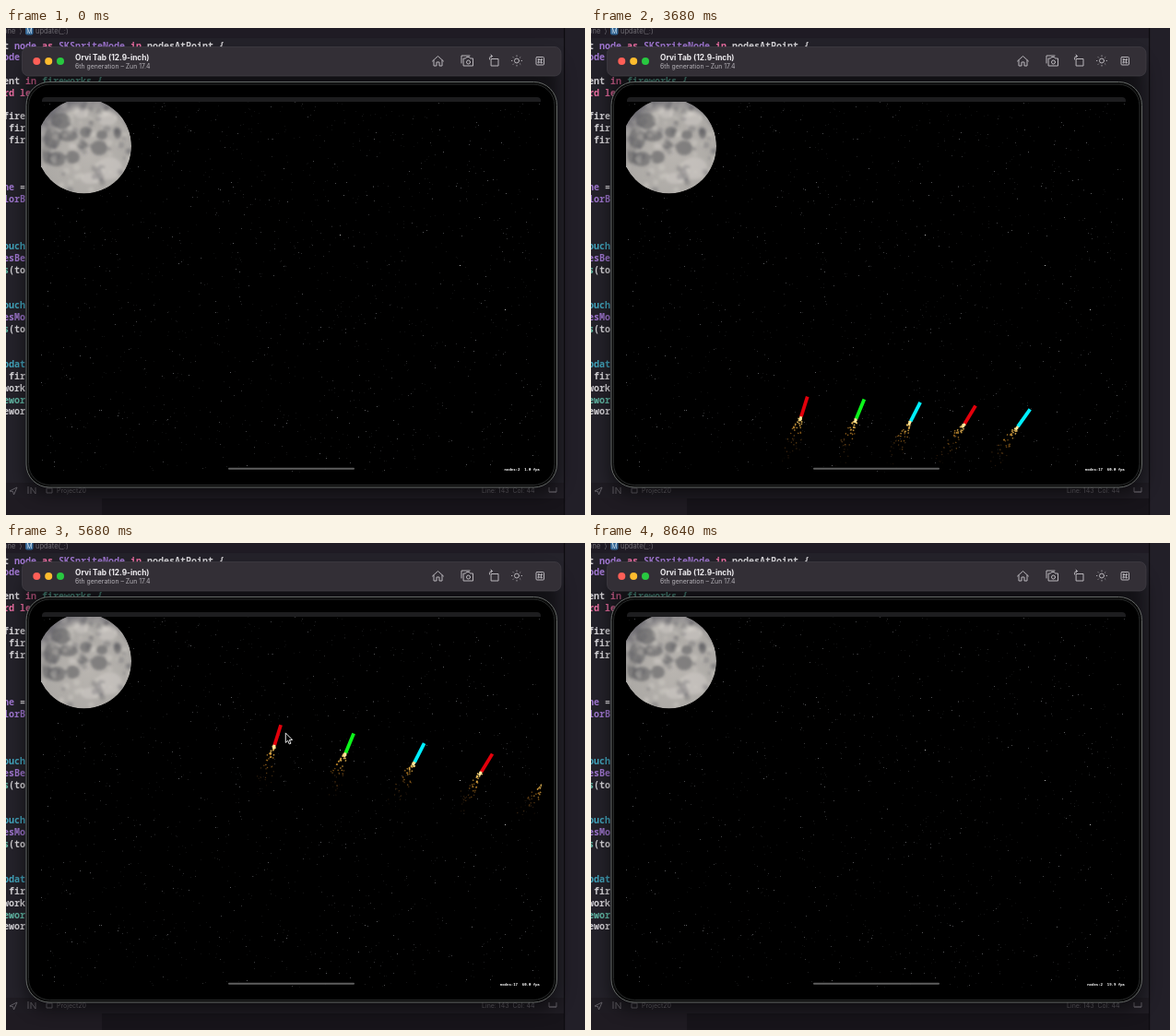
Write an HTML page with a canvas that moves like this. It is 628 by 528 pixels and loops after 8.72 s.

```html
<!DOCTYPE html>
<html lang="en">
<head>
<meta charset="utf-8">
<title>Fireworks in the simulator</title>
<style>
  html, body { margin: 0; width: 628px; height: 528px; overflow: hidden; background: #211f27; }
  svg, canvas { position: absolute; left: 0; top: 0; }
  text { white-space: pre; font-family: Inter, sans-serif; }
  .code text { font: 600 10px "Noto Sans Mono", monospace; }
  .icons { fill: none; stroke: #b9b6bb; stroke-width: 1; stroke-linejoin: round; stroke-linecap: round; }
</style>
</head>
<body>
<svg width="628" height="528" viewBox="0 0 628 528">
  <defs>
    <filter id="shadow" x="-20%" y="-20%" width="140%" height="140%"><feGaussianBlur stdDeviation="9"/></filter>
    <filter id="soft" x="-20%" y="-20%" width="140%" height="140%"><feGaussianBlur stdDeviation="1.5"/></filter>
    <radialGradient id="moonlight" cx=".55" cy=".6" r=".6">
      <stop offset="0" stop-color="#b9b5b0"/><stop offset=".8" stop-color="#aca9a5"/><stop offset="1" stop-color="#77757a"/>
    </radialGradient>
    <clipPath id="sky"><rect x="38" y="80" width="543" height="402"/></clipPath>
    <clipPath id="disc"><circle cx="84.500" cy="128" r="51.500"/></clipPath>
  </defs>

  <!-- Editor behind the simulator -->
  <rect width="628" height="528" fill="#24222a"/>
  <rect width="605" height="11" fill="#1f1b24"/>
  <rect x="605" width="1.500" height="528" fill="#0d0b10"/>
  <rect x="606.500" width="22" height="528" fill="#221f28"/>
  <rect y="493" width="605" height="17" fill="#1f1c23"/>
  <rect y="510" width="104" height="18" fill="#1f1b22"/>
  <rect x="104" y="510" width="501" height="18" fill="#17141a"/>
  <g fill="#6d6a71" font-size="7.500">
    <text x="-3" y="6">one  ⟩</text>
    <rect x="21" y="-1" width="8.500" height="8.500" rx="2" fill="#2f6290"/>
    <text x="22.300" y="5.800" font-size="7" fill="#cfe0ee">M</text>
    <text x="32" y="6">update(_:)</text>
  </g>
  <g class="code" id="code"></g>
  <g fill="none" stroke="#625f66">
    <path d="M4 502l8-4-3.500 8-1-3.500zM24 497v8M27 505v-7l5 7v-7M44 499h6v5h-6z"/>
    <path d="M589 503h8M589 498v5h8v-5"/>
  </g>
  <g fill="#6a676e" font-size="7">
    <text x="55" y="503.500">Project20</text>
    <text x="516" y="503.500">Line: 143  Col: 44</text>
  </g>
  <rect x="20" y="30" width="580" height="476" rx="24" fill="#000" opacity=".5" filter="url(#shadow)"/>

  <!-- Device -->
  <rect x="22" y="58.500" width="575.500" height="439.500" rx="25" fill="#080808" stroke="#656967"/>
  <rect x="24.500" y="61" width="570.500" height="434.500" rx="23" fill="#000" stroke="#282a2a"/>
  <path d="M39 80v-1q0-4 4-4h533q4 0 4 4v1z" fill="#1d1d1f"/>
  <g clip-path="url(#sky)">
    <g id="stars"></g>
    <g clip-path="url(#disc)">
      <circle cx="84.500" cy="128" r="51.500" fill="url(#moonlight)"/>
      <g id="moon" filter="url(#soft)"></g>
    </g>
  </g>

  <!-- Title bar -->
  <rect x="17.500" y="20.500" width="584.500" height="31.500" rx="7" fill="#332f36" stroke="#434047" stroke-width=".7"/>
  <circle cx="33.300" cy="36" r="4" fill="#ff5f57"/>
  <circle cx="46.200" cy="36" r="4" fill="#febc2e"/>
  <circle cx="59" cy="36" r="4" fill="#28c840"/>
  <text x="75" y="34.500" font-size="8.300" font-weight="700" fill="#efedf0">Orvi Tab (12.9-inch)</text>
  <text x="75" y="44" font-size="6.900" fill="#b5b2b8">6th generation – Zun 17.4</text>
  <g class="icons">
    <path d="M462.500 36l6-5.500 6 5.500M464 35v6h3v-4h3v4h3v-6"/>
    <path d="M494 38v-8h9M496.500 33h2l1-1.500h3l1 1.500h3v8h-10z"/><circle cx="501.500" cy="37" r="2"/>
    <path d="M526.500 33.500h7.500v7.500h-7.500zM524.500 34q-1-3.500 3-3.500m-1.500-1.500l1.500 1.500-1.500 1.500"/>
    <circle cx="554" cy="35.500" r="2.500"/>
    <path d="M554 30v.4M554 40.600v.4M548.500 35.500h.4M559.100 35.500h.4M550.200 31.700l.3.300M557.600 39l.3.300M550.200 39.300l.3-.3M557.600 32l.3-.3"/>
    <rect x="575" y="31.500" width="8.500" height="8.500" rx="1"/>
    <path stroke-width=".8" d="M578 34.500h2.500v2.500h-2.500zM578 34.500h-1v-1h1zM580.500 34.500v-1h1v1zM580.500 37h1v1h-1zM578 37v1h-1v-1z"/>
  </g>
</svg>
<canvas id="scene" width="628" height="528"></canvas>
<svg width="628" height="528">
  <rect x="241" y="476.800" width="137" height="2" rx="1" fill="#696969" opacity=".9"/>
  <text id="stats" x="579" y="479.700" text-anchor="end" fill="#fff" style="font:600 4px 'Noto Sans Mono',monospace"></text>
</svg>

<script>
const LOOP = 8720, STEP = 80, LAUNCH = 2850, SPEED = 0.106;
const ctx = document.getElementById('scene').getContext('2d');
const stats = document.getElementById('stats');
const rand = n => { const v = Math.sin(n * 12.9898 + 4.1) * 43758.5453; return v - Math.floor(v); };

function add(parent, tag, attrs, text = '') {
  const el = document.createElementNS('http://www.w3.org/2000/svg', tag);
  for (const name in attrs) el.setAttribute(name, attrs[name]);
  el.textContent = text;
  document.getElementById(parent).append(el);
}

// Code: row, column, text, colour
const white = '#d6d4d8', pink = '#ee6fa4', purple = '#9f76cf', cyan = '#42a5bd', teal = '#62b9a6';
[
  [0, 0, 't', white], [0, 2, 'node', purple], [0, 7, 'as', pink], [0, 10, 'SKSpriteNode', purple],
  [0, 23, 'in', pink], [0, 26, 'nodesAtPoint {', white], [1, 0, 'ode', purple],
  [3, 0, 'ent', white], [3, 4, 'in', pink], [3, 7, 'fireworks {', teal], [4, 0, 'rd le', pink],
  [6, 0, 'fire', white], [7, 1, 'fir', white], [8, 1, 'fir', white],
  [12, 0, 'ne', purple], [12, 3, '=', white], [13, 0, 'lorB', purple],
  [17, 0, 'ouch', cyan], [18, 0, 'esBe', purple], [19, 0, 's', teal], [19, 1, '(to', white],
  [22, 0, 'ouch', cyan], [23, 0, 'esMo', purple], [24, 0, 's', teal], [24, 1, '(to', white],
  [27, 0, 'pdat', cyan], [28, 1, 'fir', white], [29, 0, 'work', white], [30, 0, 'ewor', teal], [31, 0, 'ewor', white]
].forEach(([row, col, text, fill]) => add('code', 'text', { x: col * 6 - 3, y: 22.5 + row * 12.8, fill }, text));

// Night sky
for (let i = 0; i < 1700; i++) {
  add('stars', 'rect', {
    x: Math.floor(38 + rand(i) * 543), y: Math.floor(80 + rand(i + 2000) * 402), width: 1, height: 1,
    fill: '#c9cbd2', opacity: 0.07 + 0.4 * rand(i + 4000) ** 5
  });
}
[[362, 224], [492, 257], [541, 305]].forEach(([x, y]) =>
  add('stars', 'rect', { x, y, width: 1, height: 1, fill: '#b5b5b5' }));

// Moon: dark seas, bright patches, fine mottling
[
  [60, 101, 11, 9], [50, 120, 9, 12], [67, 117, 11, 6], [55, 142, 10, 8], [72, 140, 8, 7],
  [87, 113, 7, 6], [101, 130, 9, 8], [104, 116, 6, 5], [121, 114, 4, 6], [44, 136, 5, 11], [83, 127, 6, 4]
].forEach(([cx, cy, rx, ry]) => add('moon', 'ellipse', { cx, cy, rx, ry, fill: '#55555a', opacity: 0.55 }));
[[91, 163, 10, 6], [72, 128, 4, 3], [112, 152, 14, 12], [82, 92, 8, 6], [110, 98, 11, 8]]
  .forEach(([cx, cy, rx, ry]) => add('moon', 'ellipse', { cx, cy, rx, ry, fill: '#dcd8d2', opacity: 0.4 }));
for (let i = 0; i < 150; i++) {
  add('moon', 'circle', {
    cx: 34 + rand(i + 0.2) * 102, cy: 77 + rand(i + 0.6) * 102, r: 1.5 + 2.5 * rand(i + 0.8),
    fill: i % 2 ? '#e6e2dc' : '#4c4c52', opacity: 0.25
  });
}

const rockets = ['#e3000b', '#0cf51b', '#00efff', '#e3000b', '#00efff'].map((color, i) => {
  const angle = Math.atan(0.313 + 0.099 * i);
  return { color, angle, x: 205 + 53.4 * i, seed: i * 911, tapped: [5880, 6380][i] ?? Infinity,
    gone: LAUNCH + 4610 / Math.cos(angle) };
});

function drawSparks(t, r) {
  const life = 620, count = 48;
  for (let i = 0; i < count; i++) {
    const phase = t / life + i / count, age = phase % 1;
    const born = t - age * life;
    if (born < LAUNCH) continue;
    const key = r.seed + i * 7 + Math.floor(phase) * 131;
    const back = 11 + age ** 1.3 * (36 + 26 * rand(key));
    const side = (rand(key + 0.3) - 0.5) * (2 + 20 * age);
    ctx.globalAlpha = (1 - age) ** 0.8;
    ctx.fillStyle = `hsl(${44 - 18 * age} ${95 - 50 * age}% ${76 - 30 * Math.min(1, age * 1.8)}%)`;
    const size = 1.8 - age * 0.9;
    ctx.fillRect(side - size / 2, back, size, size);
  }
  ctx.globalAlpha = 1;
}

function drawRocket(t, r) {
  if (t < LAUNCH || t > r.gone) return;
  const d = (t - LAUNCH) * SPEED;
  ctx.save();
  ctx.translate(r.x + d * Math.sin(r.angle), 494.7 - d * Math.cos(r.angle));
  ctx.rotate(r.angle);
  drawSparks(t, r);
  ctx.fillStyle = t >= r.tapped ? '#f2f2f2' : r.color;
  ctx.fillRect(-1.9, -11.7, 3.8, 23);
  ctx.fillStyle = '#ffe9a0';
  ctx.fillRect(-1.2, 11, 2.4, 4.5);
  ctx.restore();
}

// Pointer: time, x, y
const trail = [[4320, 347, 332], [4480, 345, 332], [5120, 319, 330], [5840, 301, 188], [6320, 404, 148], [7120, 424, 111], [7800, 428, 106]];
const arrow = new Path2D('M0 0V10.500L2.400 8.300 4 12 5.700 11.300 4.100 7.700 7.400 7.500Z');

function drawPointer(t) {
  const k = trail.findIndex(p => p[0] > t);
  if (k < 1) return;
  const [a, b] = [trail[k - 1], trail[k]];
  let u = (t - a[0]) / (b[0] - a[0]);
  u = u * u * (3 - 2 * u);
  ctx.save();
  ctx.globalAlpha = Math.min(1, 0.3 + (t - 4320) / 230);
  ctx.translate(a[1] + (b[1] - a[1]) * u, a[2] + (b[2] - a[2]) * u);
  ctx.fillStyle = '#000';
  ctx.strokeStyle = '#e8e8e8';
  ctx.fill(arrow);
  ctx.stroke(arrow);
  ctx.restore();
}

function draw(now) {
  const t = Math.floor(now % LOOP / STEP) * STEP;
  ctx.clearRect(0, 0, 628, 528);
  ctx.save();
  ctx.beginPath();
  ctx.rect(38, 75.5, 543, 406.5);
  ctx.clip();
  rockets.forEach(r => drawRocket(t, r));
  ctx.restore();
  drawPointer(t);

  const flying = t < LAUNCH ? 0 : rockets.filter(r => t < r.gone).length;
  const fps = t < LAUNCH ? '1.0' : t < 8000 ? '60.0' : '59.9';
  stats.textContent = `nodes:${2 + 3 * flying}  ${fps} fps`;
  requestAnimationFrame(draw);
}
requestAnimationFrame(draw);
</script>
</body>
</html>
```
